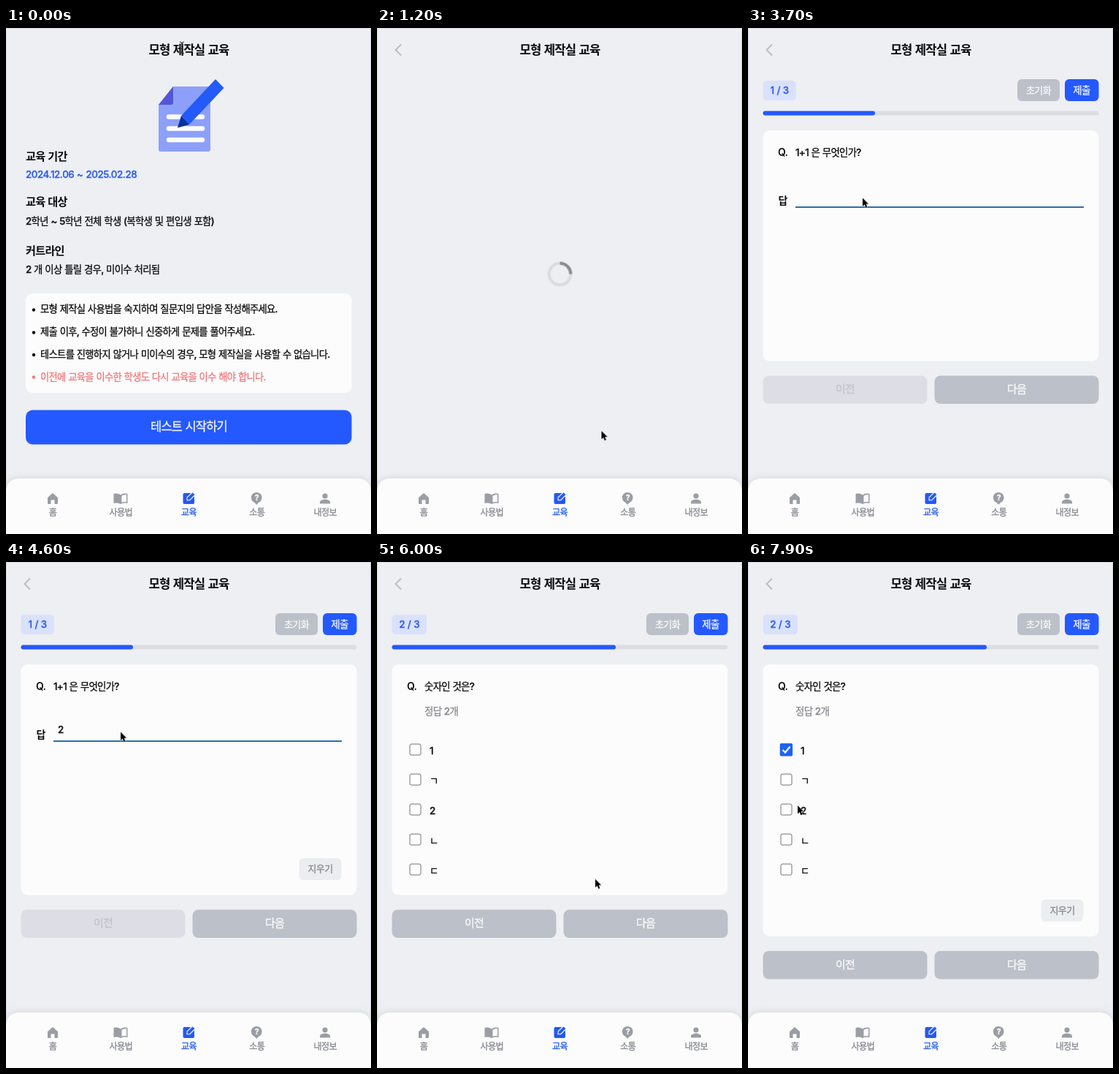
Animation, 500 px wide and 692 px high, one loop 8000 ms. Source, as an HTML page:

```html
<!DOCTYPE html>
<html lang="ko">
<head>
<meta charset="utf-8">
<title>모형 제작실 교육</title>
<style>
  html, body { margin: 0; width: 100%; height: 100%; overflow: hidden; background: #eeeff3; }
  svg { display: block; width: 500px; height: 692px; color: #0c0c0e; }

  /* y of a text is its visual middle; the thin stroke gives a medium weight */
  text {
    font: 500 13.4px Inter, "Noto Sans CJK KR", "Noto Sans CJK", sans-serif;
    letter-spacing: -.051em;
    word-spacing: .05em;
    transform: translateY(.36em);
    fill: currentColor;
    stroke: currentColor;
    stroke-width: .28px;
  }
  .mid { text-anchor: middle; }
  .title, .head, .strong { font-weight: 600; stroke: none; }
  .title { font-size: 16.7px; }
  .head { font-size: 15.2px; }
  .strong { font-size: 14px; }
  .note { font-size: 13.3px; }
  .start { font-size: 16.5px; }
  .big { font-size: 15px; }
  .small { font-size: 13px; }
  .digits { letter-spacing: -.033em; }
  .tab { font-size: 12.1px; color: #85888f; }
  .mark { font-size: 10.5px; font-weight: 700; }
  .light { color: #fafafc; }
  .blue { color: #2459f5; }
  .red { color: #f2777b; }
  .dim { color: #86888d; }
  .card { fill: #fcfcfc; }
  .gray { fill: #bcc0c8; }
  .icon { fill: #9a9da4; }

  .step, .move { animation: 8s step-end infinite; }
  .move { animation-timing-function: ease-in-out; }
  .home { animation-name: home; }
  .later { animation-name: later; }
  .loader { animation-name: loader; }
  .quiz { animation-name: quiz; }
  .first { animation-name: first; }
  .second { animation-name: second; }
  .focus { animation-name: focus; }
  .typed { animation-name: typed; }
  .checked { animation-name: checked; }
  .grow { animation-name: grow; }
  .shift { animation-name: shift; }
  .prev { animation-name: prev; }
  .prev-label { animation-name: prev-label; }
  .bar { animation-name: bar; }
  .hover { animation-name: hover; }
  .press { animation-name: press; transform-box: fill-box; transform-origin: center; }
  .pointer { animation-name: pointer; }
  .beam { animation-name: beam; }
  .arrow { animation-name: arrow; }
  .spin { animation: spin 1s .2s linear infinite; }

  @keyframes home { 0% { opacity: 1 } 12.5% { opacity: 0 } }
  @keyframes later { 0% { opacity: 0 } 12.5% { opacity: 1 } }
  @keyframes loader { 0% { opacity: 0 } 12.5% { opacity: 1 } 23.75% { opacity: 0 } }
  @keyframes quiz { 0% { opacity: 0 } 23.75% { opacity: 1 } }
  @keyframes first { 0% { opacity: 1 } 68.75% { opacity: 0 } }
  @keyframes second { 0% { opacity: 0 } 68.75% { opacity: 1 } }
  @keyframes focus { 0% { opacity: 0 } 46.2% { opacity: 1 } 66.25% { opacity: 0 } }
  @keyframes typed { 0% { opacity: 0 } 53.75% { opacity: 1 } }
  @keyframes checked { 0% { opacity: 0 } 88.75% { opacity: 1 } }
  @keyframes grow { 0% { height: 315.5px } 88.75% { height: 372px } }
  @keyframes shift { 0% { transform: none } 88.75% { transform: translateY(56.5px) } }
  @keyframes prev { 0% { fill: #dddee5 } 68.75% { fill: #bcc0c8 } }
  @keyframes prev-label { 0% { color: #c1c3cb } 68.75% { color: #fafafc } }
  @keyframes bar { 0%, 68.75% { width: 153.5px } 72.5%, 100% { width: 306.5px } }
  @keyframes hover { 0%, 65% { fill: #bcc0c8 } 66.5%, 71.5% { fill: #adb0b7 } 73.5%, 100% { fill: #bcc0c8 } }
  @keyframes press { 0%, 66.25% { transform: none } 67.2%, 68.5% { transform: scale(.955) } 69.75%, 100% { transform: none } }
  @keyframes beam { 0% { opacity: 1 } 2.5% { opacity: 0 } }
  @keyframes arrow { 0% { opacity: 0 } 2.5% { opacity: 1 } }
  @keyframes spin { from { transform: rotate(0) } to { transform: rotate(360deg) } }
  @keyframes pointer {
    0%, .6% { transform: translate(241px, 27px) }
    11.25%, 31.25% { transform: translate(307.5px, 551px) }
    42.5%, 57.5% { transform: translate(157px, 232.5px) }
    66.25% { transform: translate(320px, 504.5px) }
    68.75% { transform: translate(320px, 504.5px); animation-timing-function: ease-in }
    75% { transform: translate(299.5px, 434px); animation-timing-function: ease-out }
    86.25%, 96.25% { transform: translate(51px, 256px) }
    98.7%, 100% { transform: translate(68px, 333px) }
  }
</style>
</head>
<body>
<svg viewBox="0 0 500 692">
  <defs>
    <filter id="soft" x="-10%" y="-30%" width="120%" height="160%">
      <feDropShadow dx="0" dy="-1" stdDeviation="4" flood-color="#70758a" flood-opacity=".2"/>
    </filter>
    <rect id="box" x="45" y="-7.5" width="15" height="15" rx="2" fill="#fff" stroke="#707277"/>
    <g id="clear">
      <rect x="401.5" y="405" width="58" height="30" rx="6" fill="#ecedf0"/>
      <text class="small mid dim" x="430.5" y="419.5">지우기</text>
    </g>
  </defs>

  <rect width="500" height="692" fill="#eeeff3"/>
  <path d="M.5 692V.5H499.5V692" fill="none" stroke="#dedfe3"/>
  <text class="title mid" x="250.5" y="30">모형 제작실 교육</text>
  <path class="step later" d="M33 22.5L25.5 30L33 37.5" fill="none" stroke="#bbbdc3" stroke-width="2"/>

  <g class="step home">
    <path d="M209 105L229 80H277Q280 80 280 83V166Q280 169 277 169H212Q209 169 209 166Z" fill="#8ca0fa"/>
    <path d="M209 105L229 80V102Q229 105 226 105Z" fill="#5457d5"/>
    <path d="M223 121.5H269M223 137.5H269M223 153H269" stroke="#fcfcfc" stroke-width="6.4" stroke-linecap="round"/>
    <path d="M240 120L287 70L298.5 82L251 132Z" fill="#2459fa"/>
    <path d="M240 120L251 132L235 136.5Z" fill="#0a2f9f"/>

    <text class="head" x="27" y="176">교육 기간</text>
    <text class="blue digits" x="27" y="200.5">2024.12.06 ~ 2025.02.28</text>
    <text class="head" x="27" y="238">교육 대상</text>
    <text x="27" y="264.5">2학년 ~ 5학년 전체 학생 (복학생 및 편입생 포함)</text>
    <text class="head" x="27" y="304.5">커트라인</text>
    <text x="27" y="330.5">2 개 이상 틀릴 경우, 미이수 처리됨</text>

    <rect class="card" x="27" y="363" width="446.5" height="136" rx="9"/>
    <g fill="currentColor">
      <circle cx="38" cy="385.5" r="2.2"/>
      <circle cx="38" cy="416.5" r="2.2"/>
      <circle cx="38" cy="447" r="2.2"/>
      <circle class="red" cx="38" cy="477.5" r="2.2" fill="currentColor"/>
    </g>
    <text class="note" x="47" y="384.7">모형 제작실 사용법을 숙지하여 질문지의 답안을 작성해주세요.</text>
    <text class="note" x="47" y="415.5">제출 이후, 수정이 불가하니 신중하게 문제를 풀어주세요.</text>
    <text class="note" x="47" y="446.2">테스트를 진행하지 않거나 미이수의 경우, 모형 제작실을 사용할 수 없습니다.</text>
    <text class="note red" x="47" y="477">이전에 교육을 이수한 학생도 다시 교육을 이수 해야 합니다.</text>

    <rect x="27" y="522.5" width="446.5" height="47" rx="9.5" fill="#2459ff"/>
    <text class="start mid light" x="250.5" y="545.3">테스트 시작하기</text>
  </g>

  <g class="step loader">
    <g transform="translate(250.5 336.5)" fill="none" stroke-width="4">
      <circle r="14.8" stroke="#dadbdd"/>
      <path class="spin" d="M0 -14.8A14.8 14.8 0 0 1 14.8 0" stroke="#8a8b8d"/>
    </g>
  </g>

  <g class="step quiz">
    <rect x="369" y="70" width="58" height="30" rx="6" class="gray"/>
    <text class="small mid light" x="398" y="85">초기화</text>
    <rect x="434" y="70" width="46.5" height="30" rx="6" fill="#2459ff"/>
    <text class="mid light" x="457" y="85">제출</text>
    <rect x="20.5" y="113.5" width="460" height="6" rx="3" fill="#dcdde2"/>
    <rect class="move bar" x="20.5" y="113.5" width="153.5" height="6" rx="3" fill="#2459ff"/>
    <rect class="card step grow" x="20.5" y="140" width="460" height="315.5" rx="9"/>
    <text class="strong" x="41" y="170">Q.</text>

    <g class="step first">
      <rect x="20.5" y="72" width="45.5" height="27" rx="5" fill="#d9e1fd"/>
      <text class="mid blue digits" x="43.2" y="85.5">1 / 3</text>
      <text x="65" y="170">1+1 은 무엇인가?</text>
      <text class="strong" x="41.5" y="235.5">답</text>
      <path d="M65 245.5H460" stroke="#d5d5d8"/>
      <path class="step focus" d="M65 245H460" stroke="#2f6da8" stroke-width="2"/>
      <g class="step typed">
        <text x="71" y="229">2</text>
        <use href="#clear"/>
      </g>
    </g>

    <g class="step second">
      <rect x="20.5" y="72" width="47.5" height="27" rx="5" fill="#d9e1fd"/>
      <text class="mid blue digits" x="44.2" y="85.5">2 / 3</text>
      <text x="65" y="170">숫자인 것은?</text>
      <text class="dim" x="65" y="204.5">정답 2개</text>
      <use href="#box" y="256.5"/><text x="72" y="258.5">1</text>
      <use href="#box" y="297.5"/><text x="72" y="299.5">ㄱ</text>
      <use href="#box" y="338.5"/><text x="72" y="340.5">2</text>
      <use href="#box" y="379.5"/><text x="72" y="381.5">ㄴ</text>
      <use href="#box" y="420.5"/><text x="72" y="422.5">ㄷ</text>
      <g class="step checked">
        <rect x="43.7" y="248" width="17.4" height="17.4" rx="2" fill="#1c63f2"/>
        <path d="M47.5 257L51 260.5L57.5 252.5" fill="none" stroke="#fff" stroke-width="2.2"/>
        <use href="#clear" y="56.5"/>
      </g>
    </g>

    <g class="step shift">
      <rect class="step prev" x="20.5" y="475.5" width="225" height="38.5" rx="8"/>
      <text class="big mid step prev-label" x="133" y="494">이전</text>
      <g class="move press">
        <rect class="move hover" x="255.5" y="475.5" width="225" height="38.5" rx="8"/>
        <text class="big mid light" x="368" y="494">다음</text>
      </g>
    </g>
  </g>

  <path class="card" filter="url(#soft)" d="M0 692V636Q0 616 20 616H480Q500 616 500 636V692Z"/>
  <g class="icon">
    <path d="M57 642.2L64 636L71 642.2V650Q71 651 70 651H66.5V645.5H61.5V651H58Q57 651 57 650Z"/>
    <path d="M157 638.5Q153 635.5 147.5 637V650Q153 648.5 157 651Q161 648.5 166.5 650V637Q161 635.5 157 638.5Z"/>
    <path d="M158.500 639.7Q161.5 637.7 165 638.3V648.2Q161.5 647.6 158.5 648.8Z" fill="#fcfcfc"/>
    <path d="M343.2 635A7.2 7.2 0 0 1 346 648.9L343.2 652L340.4 648.9A7.2 7.2 0 0 1 343.2 635Z"/>
    <circle cx="437" cy="640" r="3.6"/>
    <path d="M430 650.5V648.8C430 645.8 434 644.8 437 644.8S444 645.8 444 648.8V650.5Z"/>
  </g>
  <text class="mid light mark" x="343.4" y="642.2">?</text>
  <rect x="242.5" y="636" width="15.5" height="15" rx="2" fill="#2459f5"/>
  <path d="M247.5 646.3V641.8L256 633.5L260.5 638L252 646.3Z" fill="#fcfcfc"/>
  <path d="M248.9 644.9V642.4L255.6 635.7L258.1 638.2L251.4 644.9Z" fill="#2459f5" stroke="#2459f5" stroke-width=".6" stroke-linejoin="round"/>
  <text class="tab mid" x="64" y="662.5">홈</text>
  <text class="tab mid" x="157.2" y="662.5">사용법</text>
  <text class="tab mid blue" x="250.6" y="662.5">교육</text>
  <text class="tab mid" x="343.8" y="662.5">소통</text>
  <text class="tab mid" x="437.2" y="662.5">내정보</text>

  <g class="move pointer">
    <path class="step beam" d="M-3 -8Q0 -8 0 -5.5Q0 -8 3 -8M0 -6V6M-3 8Q0 8 0 5.5Q0 8 3 8M-1.5 1.5H1.5" fill="none" stroke="#222"/>
    <path class="step arrow" d="M0 0V11.5L2.6 9L4.4 13.2L6.4 12.3L4.6 8.2H8.2Z" fill="#000" stroke="#fff" stroke-width="1" paint-order="stroke"/>
  </g>
</svg>
</body>
</html>
```
